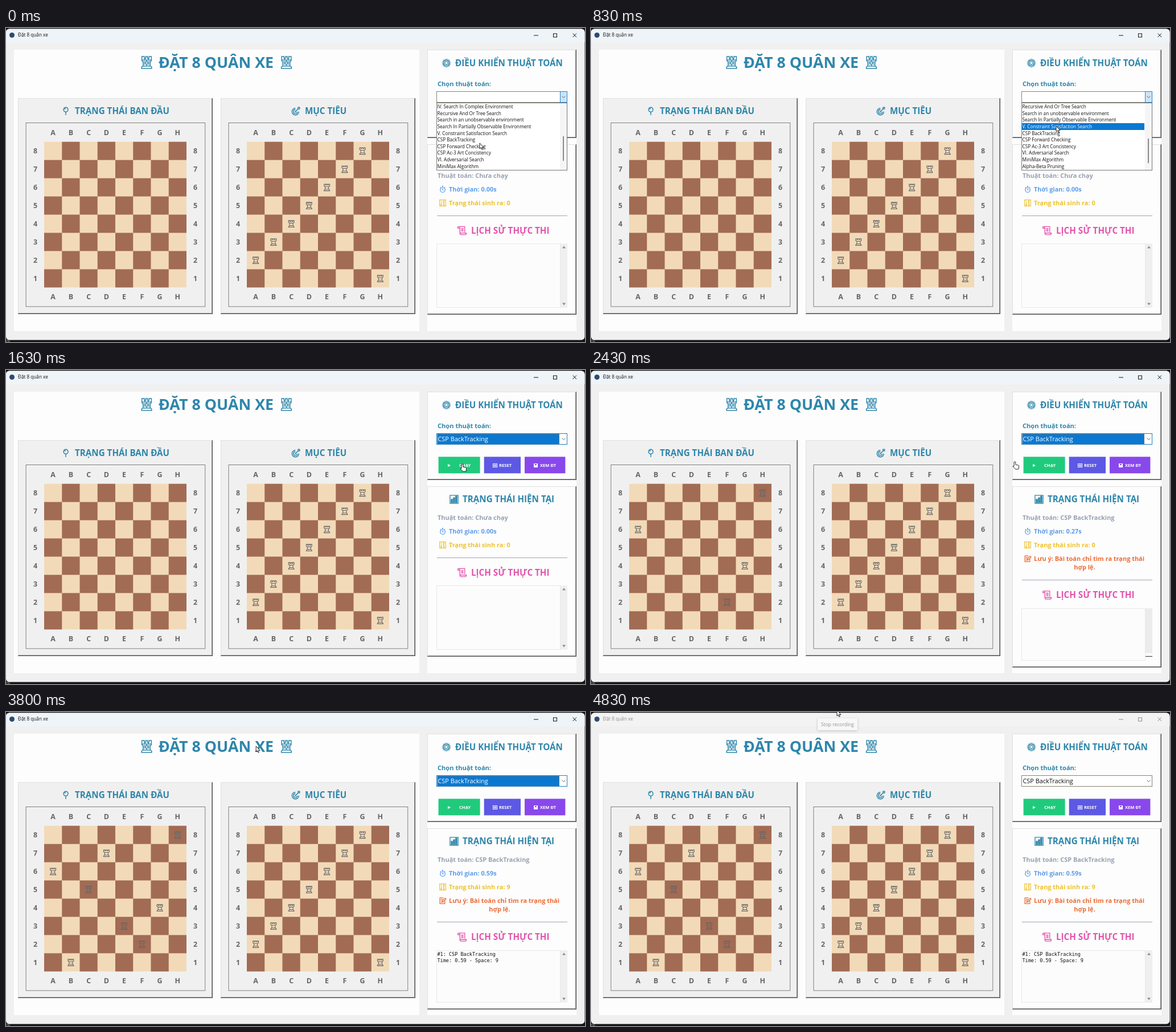
Animation, 1017 px wide and 551 px high, one loop 4860 ms. Source, as an HTML page with a canvas:

```html
<!DOCTYPE html>
<html lang="vi">
<head>
<meta charset="utf-8">
<title>Đặt 8 quân xe</title>
<style>
html, body { margin: 0; width: 100%; height: 100%; overflow: hidden; background: #111; }
canvas { display: block; }
</style>
</head>
<body>
<canvas id="stage" width="1017" height="551"></canvas>
<script>
const ctx = document.getElementById('stage').getContext('2d');
const LOOP = 4860, PICK = 1120, RUN = 2120, DONE = 2720, LEAVE = 4560, STEP = 67.5;
const TEAL = '#2e86ab', PINK = '#e354ad', BLUE = '#5d9cec', YELLOW = '#efc12d',
      ORANGE = '#ec6b35', MUTED = '#97a1b1', BG = '#f0f0f0', PAPER = '#fdfdfd';
const SANS = '"Open Sans", "Noto Sans", sans-serif';
const MONO = '"DejaVu Sans Mono", monospace';
const HEAD = 15.2, LABEL = 10.95;

const ITEMS = ['IV. Search In Complex Environment', 'Recursive And Or Tree Search',
  'Search in an unobservable environment', 'Search In Partially Observable Environment',
  'V. Constraint Satisfaction Search', 'CSP BackTracking', 'CSP Forward Checking',
  'CSP Ac-3 Art Concistency', 'VI. Adversarial Search', 'MiniMax Algorithm', 'Alpha-Beta Pruning'];
const PLACED = ['H8', 'A6', 'G4', 'F2', 'D7', 'C5', 'E3', 'B1'];
const GOAL = ['G8', 'F7', 'E6', 'D5', 'C4', 'B3', 'A2', 'H1'];

// Outline icons on a 24-unit grid
const ICON = {
  rook: 'M5.500 4.500h3v2h2v-2h3v2h2v-2h3v4.500l-2.500 1.500v6l2 1.500v2h-12v-2l2-1.500v-6L5.500 9zM8 10.500h8M8 16.500h8M4.500 20h15',
  tower: 'M4 2h4v3h2.500V2h3v3H16V2h4v7l-2 2v7l2.500 1.500V22h-17v-2.500L6 18v-7L4 9zM4 8h16M6 11h12M6 14.500h12M6 18h12M9 5v3M15 5v3M12 8v3M9.500 11v3.500M14.500 11v3.500M12 14.500V18',
  pin: 'M12 2a6 6 0 1 0 .1 0zM12 14v8M9 7a3 3 0 0 1 3-2',
  target: 'M11 4a9 9 0 1 0 9 9M11 8a5 5 0 1 0 5 5M11 12.5a.7.7 0 1 0 .1 0M11 13l7-7V2l4 0v4l-4 0',
  gear: 'M12 8a4 4 0 1 0 .1 0zM12 5a7 7 0 1 0 .1 0zM12 1v4M12 19v4M1 12h4M19 12h4M4 4l3 3M17 17l3 3M20 4l-3 3M7 17l-3 3M9 2l-1 4M15 2l1 4M9 22l-1-4M15 22l1-4M2 9l4-1M2 15l4 1M22 9l-4-1M22 15l-4 1',
  chart: 'M2 2h20v20H2zM5 12h3v8H5zM10.5 8h3v12h-3zM16 4h3v16h-3zM6.500 13v6M12 9v10M17.500 5v14',
  watch: 'M12 6a8 8 0 1 0 .1 0zM12 9v5h3M10 2h4M12 2v4M18 5l2 2M6 5L4 7',
  digits: 'M2 2h20v20H2zM7 5v6M14 5h3v3h-3v3h3M6 14h3v3H6v3h3M14 14h3v6h-3M14 17h3',
  note: 'M15 3H3v19h16v-9M6 8h7M6 12h4M6 17h4M10 17l1-4L20 4l3 3-9 9z',
  scroll: 'M6 18V5q0-3-3-3t-2 4h5M4 2h14v14M6 18h16q0 4-3 4H9q-3 0-3-4M9 7h6M9 10h6M9 13h6'
};

function icon(name, x, y, size, color, width = 2) {
  const k = size / 24;
  ctx.save();
  ctx.translate(x - size / 2, y - size / 2);
  ctx.scale(k, k);
  ctx.strokeStyle = color;
  ctx.lineWidth = width;
  ctx.stroke(new Path2D(ICON[name]));
  ctx.restore();
}

function rect(x, y, x2, y2, color) {
  ctx.fillStyle = color;
  ctx.fillRect(x, y, x2 - x, y2 - y);
}

function frame(x, y, x2, y2, fill, edge) {
  rect(x, y, x2, y2, edge);
  rect(x + 1, y + 1, x2 - 1, y2 - 1, fill);
}

function raised(x, y, x2, y2, fill) {
  rect(x, y, x2, y2, '#505050');
  rect(x, y, x2 - 1, y2 - 1, '#e0e0e0');
  rect(x + 1, y + 1, x2 - 1, y2 - 1, '#949494');
  rect(x + 1, y + 1, x2 - 2, y2 - 2, fill);
}

// y is the middle of the capital letters
function text(s, x, y, size, color, weight = 700, family = SANS, align = 'left') {
  ctx.font = `${weight} ${size}px ${family}`;
  ctx.textAlign = align;
  ctx.fillStyle = color;
  ctx.fillText(s, x, y + size * 0.357);
}

function line(points, color, width = 1) {
  ctx.beginPath();
  points.forEach(([x, y]) => ctx.lineTo(x, y));
  ctx.strokeStyle = color;
  ctx.lineWidth = width;
  ctx.stroke();
}

function triangle(x, y, dir) {
  ctx.beginPath();
  ctx.moveTo(x - 3, y + 2 * dir);
  ctx.lineTo(x + 3, y + 2 * dir);
  ctx.lineTo(x, y - 2 * dir);
  ctx.fillStyle = '#8b8b8b';
  ctx.fill();
}

function drawWindow(active) {
  rect(0, 0, 1017, 551, '#151515');
  text('nc', 0, 549, 7, '#bbb', 400);
  ctx.beginPath();
  ctx.roundRect(0, 1.5, 1016.5, 546, 6);
  ctx.fillStyle = BG;
  ctx.fill();
  ctx.save();
  ctx.clip();
  rect(0, 1, 1017, 25, active ? '#eff4f9' : '#f3f3f3');
  ctx.restore();
  ctx.beginPath();
  ctx.arc(10.5, 12.5, 4.5, 0, 7);
  ctx.fillStyle = '#2d4a70';
  ctx.fill();
  const ink = active ? '#111' : '#8c8c8c';
  text('Đặt 8 quân xe', 21, 12.5, 8.2, ink, 400);
  line([[927, 13], [935, 13]], ink);
  ctx.strokeRect(961.5, 10, 6, 6);
  line([[995.5, 9.5], [1002, 16]], ink);
  line([[1002, 9.5], [995.5, 16]], ink);
  rect(14, 38, 726, 532, PAPER);
  rect(740, 38, 1002, 532, PAPER);
}

function drawBoard(x, title, titleX, name, rooks) {
  raised(x, 123, x + 342, 502, BG);
  icon(name, titleX - 16, 146, 16, TEAL, 2.3);
  text(title, titleX, 146, HEAD, TEAL);
  rect(x + 14, 166, x + 330, 490, '#fff');
  ctx.lineWidth = 1;
  ctx.strokeStyle = '#747474';
  ctx.strokeRect(x + 14.2, 166.5, 314.6, 322.4);
  rect(x + 16, 168, x + 328, 488, BG);

  const left = x + 46, top = 199.7, cell = 31.25, high = 31.95;
  rect(left, top, left + 8 * cell, top + 8 * high, '#f2dab8');
  for (let i = 0; i < 8; i++) {
    const cx = left + (i + 0.5) * cell, cy = top + (i + 0.5) * high;
    for (const y of [184, 472]) text('ABCDEFGH'[i], cx, y, 12.5, '#666', 700, SANS, 'center');
    for (const lx of [x + 30.5, x + 311.5]) text(8 - i, lx, cy, 12.5, '#666', 700, SANS, 'center');
    for (let j = 1 - i % 2; j < 8; j += 2)
      rect(left + j * cell, top + i * high, left + (j + 1) * cell, top + (i + 1) * high, '#a26b54');
  }
  for (const [file, rank] of rooks)
    icon('rook', left + ('ABCDEFGH'.indexOf(file) + 0.5) * cell, top + (8.5 - rank) * high, 18, '#666', 1.5);
}

function drawControls(t) {
  raised(740, 38, 1002, 193, PAPER);
  icon('gear', 773.5, 61.5, 17, TEAL, 1.7);
  text('ĐIỀU KHIỂN THUẬT TOÁN', 789, 61.5, HEAD, TEAL);
  text('Chọn thuật toán:', 758, 98.5, 11.1, TEAL);

  const open = t < PICK, focused = !open && t < LEAVE;
  frame(756, 111, 986, 131, '#fff', focused ? '#2280c5' : '#83836f');
  if (focused) {
    rect(757.5, 112, 972, 130.5, '#0a78d1');
    ctx.setLineDash([1, 1]);
    ctx.strokeStyle = '#8a7d6c';
    ctx.lineWidth = 1;
    ctx.strokeRect(758, 112.5, 213.5, 17.5);
    ctx.setLineDash([]);
  }
  if (open) frame(973, 111, 986, 131, '#cce4f7', '#2a84c6');
  else text('CSP BackTracking', 758.5, 121.5, 10.9, focused ? '#fff' : '#111', 400);
  line([[976.5, 119.5], [979.5, 122.5], [982.5, 119.5]], '#666');

  const buttons = [[759.6, 832.6, '#20ca7c'], [839.7, 904, '#5d59e4'], [911, 982.4, '#8848eb']];
  for (const [x, x2, color] of buttons) rect(x, 152.3, x2, 181.3, color);
  ctx.beginPath();
  ctx.moveTo(776, 165);
  ctx.lineTo(781, 167.5);
  ctx.lineTo(776, 170);
  ctx.fillStyle = '#fff';
  ctx.fill();
  text('CHẠY', 796, 167.5, 7.6, '#fff');
  ctx.strokeStyle = '#fff';
  ctx.lineWidth = 1;
  ctx.strokeRect(855.5, 164.5, 7, 6);
  ctx.strokeRect(857.5, 166.5, 3, 2);
  text('RESET', 866, 167.5, 7.6, '#fff');
  rect(927, 164, 934, 171, '#fff');
  rect(929, 165, 932, 167, '#8848eb');
  text('XEM ĐT', 938, 167.5, 7.6, '#fff');
}

function drawStatus(t) {
  const started = t >= RUN, done = t >= DONE, shift = started ? 39.5 : 0;
  const bottom = started ? 522 : 503;
  raised(740, 204, 1002, bottom, PAPER);
  icon('chart', 787, 227, 17, TEAL, 1.9);
  text('TRẠNG THÁI HIỆN TẠI', 802, 227, HEAD, TEAL);
  text('Thuật toán: ' + (started ? 'CSP BackTracking' : 'Chưa chạy'), 758, 259, LABEL, MUTED);
  const steps = Math.min(8, Math.floor((t - RUN) / STEP));
  const time = done ? '0.59' : started ? (steps * STEP / 1000).toFixed(2) : '0.00';
  icon('watch', 767, 283, 13, BLUE, 2.3);
  text(`Thời gian: ${time}s`, 778, 283, LABEL, BLUE);
  icon('digits', 767, 307, 13, YELLOW);
  text('Trạng thái sinh ra: ' + (done ? 9 : 0), 778, 307, LABEL, YELLOW);
  if (started) {
    icon('note', 767, 331, 13, ORANGE, 2.3);
    text('Lưu ý: Bài toán chỉ tìm ra trạng thái', 778, 331, LABEL, ORANGE);
    text('hợp lệ.', 867, 346, LABEL, ORANGE, 700, SANS, 'center');
  }
  const sep = Math.floor(329 + shift);
  rect(757, sep, 986, sep + 1, '#a3a5b5');
  icon('scroll', 801.5, 355.5 + shift, 17, PINK, 1.9);
  text('LỊCH SỬ THỰC THI', 817, 355.5 + shift, HEAD, PINK);

  const top = started ? 418 : 378, end = started ? 510 : 491;
  frame(756, top, 974, end, '#fcfcfc', '#e9e9e9');
  if (started && !done) {
    rect(974, top, 986, 497, '#ececec');
    rect(974, 502, 986, 503, '#333');
  } else {
    rect(974, top, 986, end, '#efefef');
    triangle(980, top + 6.5, 1);
    triangle(980, end - 6.5, -1);
  }
  if (done) {
    text('#1: CSP BackTracking', 757.5, 424.5, 8.5, '#111', 400, MONO);
    text('Time: 0.59 - Space: 9', 757.5, 435.5, 8.5, '#111', 400, MONO);
  }
}

function drawList(t, cursorY) {
  const first = t < 330 ? 0 : 1, row = 11.65;
  const hover = first && t > 400 ? Math.floor((cursorY - 132) / row) : -1;
  frame(756, 131, 986, 250, '#fff', '#777');
  rect(973, 132, 985, 249, '#f5f5f5');
  rect(978, 190 + first * 4, 980, 233 + first * 4, '#8a8a8a');
  ITEMS.slice(first, first + 10).forEach((item, i) => {
    const y = 138 + i * row;
    if (i === hover) rect(757, y - 6, 972, y + 6, '#0a78d1');
    text(item, 757.5, y, 8.2, i === hover ? '#fff' : '#111', 400);
  });
}

// Time and pointer tip
const PATH = [[0, 832, 202], [380, 832, 202], [800, 817, 172], [900, 817, 172], [1080, 818, 185],
  [1170, 818, 185], [1560, 800, 165], [2050, 800, 165], [2400, 743, 161], [2500, 743, 161],
  [3220, 441, 79], [3600, 441, 79], [4250, 433, -5], [4500, 433, -5], [4800, 432, -3], [LOOP, 432, -3]];

function pointerAt(t) {
  const i = PATH.findIndex(p => p[0] > t);
  const [t0, x0, y0] = PATH[i - 1], [t1, x1, y1] = PATH[i];
  const u = (t - t0) / (t1 - t0), e = u * u * (3 - 2 * u);
  return [x0 + (x1 - x0) * e, y0 + (y1 - y0) * e];
}

const ARROW = new Path2D('M0 0v10l2.300-2 1.600 3.400 1.500-.7-1.500-3.200H7z');
const HAND = new Path2D('M1 0q1.300-.5 1.800 1v4l5 1.200q1 .4.9 1.800l-.8 5H2.500L-1.800 8.500q-.3-1.500 1.800-.5V1q0-.8 1-1z');

function drawPointer(x, y, hand) {
  const shape = hand ? HAND : ARROW;
  ctx.save();
  ctx.translate(x, y);
  ctx.fillStyle = '#fff';
  ctx.fill(shape);
  ctx.strokeStyle = '#111';
  ctx.lineWidth = 0.9;
  ctx.stroke(shape);
  ctx.restore();
}

function drawTooltip() {
  ctx.save();
  ctx.shadowColor = '#0003';
  ctx.shadowBlur = 4;
  ctx.shadowOffsetY = 1;
  rect(398, 11, 468, 32, '#f7f7f7');
  ctx.restore();
  text('Stop recording', 404, 21.5, 8.5, '#949494', 400);
}

function draw(t) {
  const [x, y] = pointerAt(t);
  const count = Math.max(0, Math.min(8, Math.floor((t - RUN) / STEP)));
  drawWindow(t < LEAVE);
  icon('tower', 247, 60.5, 25, TEAL, 1.4);
  text('ĐẶT 8 QUÂN XE', 268, 60.5, 26.8, TEAL);
  icon('tower', 492.5, 60.5, 25, TEAL, 1.4);
  drawBoard(21, 'TRẠNG THÁI BAN ĐẦU', 121, 'pin', PLACED.slice(0, count));
  drawBoard(377, 'MỤC TIÊU', 525, 'target', GOAL);
  drawControls(t);
  drawStatus(t);
  if (t < PICK) drawList(t, y);
  if (t >= LEAVE) drawTooltip();
  drawPointer(x, y, t > 1480 && t < DONE);
}

const start = performance.now();
function tick() {
  draw((performance.now() - start) % LOOP);
  requestAnimationFrame(tick);
}
tick();
</script>
</body>
</html>
```
